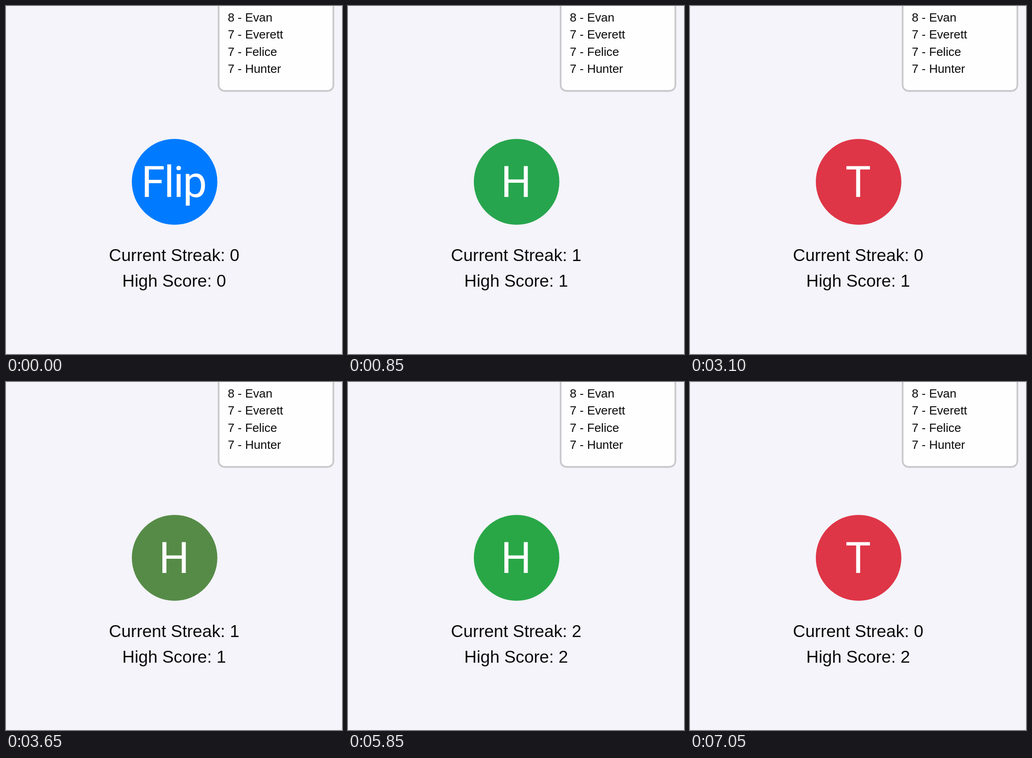
An HTML page for the animation above (7.1 s loop, 737 by 760 pixels).

```html
<!DOCTYPE html>
<html lang="en">
<head>
<meta charset="utf-8">
<title>Coin flip</title>
<style>
  html, body { margin: 0; width: 100%; height: 100%; overflow: hidden; background: #f4f4fa; }
  svg { display: block; }
  text { font-family: "Liberation Sans", Arial, sans-serif; fill: #0a0a0c; }
  #names text { font-size: 26.32px; }
  .score { font-size: 37.6px; text-anchor: middle; }
  #label { font: 94px Roboto, sans-serif; letter-spacing: -2.2px; text-anchor: middle; fill: #fff; }
</style>
</head>
<body>
<svg width="737" height="760" viewBox="0 0 737 760">
  <rect x="466.4" y="-60" width="251.7" height="245.5" rx="13" fill="#fefefe" stroke="#c9c9cd" stroke-width="3.76"/>
  <g id="names">
    <text x="486.4" y="33.8">8 - Evan</text>
    <text x="486.4" y="71.3">7 - Everett</text>
    <text x="486.4" y="108.8">7 - Felice</text>
    <text x="486.4" y="146.3">7 - Hunter</text>
  </g>
  <g id="coin">
    <circle id="disc" cx="369.8" cy="384" r="93.8"/>
    <text id="label" x="367.7" y="416.7"></text>
  </g>
  <text id="streak" class="score" x="368.9" y="557.1"></text>
  <text id="high" class="score" x="368.9" y="613.3"></text>
</svg>
<script>
const LOOP = 7100, PULSE = 140, FADE = 300;
const BLUE = [0, 123, 255], GREEN = [41, 167, 71], RED = [222, 54, 71];
const states = [
  { at: -1000, label: "Flip", color: BLUE, streak: 0, high: 0 },
  { at: 610, label: "H", color: GREEN, streak: 1, high: 1 },
  { at: 2110, label: "T", color: RED, streak: 0, high: 1 },
  { at: 3500, label: "H", color: GREEN, streak: 1, high: 1 },
  { at: 4950, label: "H", color: GREEN, streak: 2, high: 2 },
  { at: 6400, label: "T", color: RED, streak: 0, high: 2 },
];
const el = id => document.getElementById(id);
const progress = (t, length) => Math.min(1, t / length);
const easeOut = p => 1 - (1 - p) ** 2;

function draw(t) {
  const i = states.findLastIndex(s => s.at <= t);
  const now = states[i], before = states[Math.max(0, i - 1)];
  const age = t - now.at;

  // Each tap swells the coin briefly while its colour fades to the result.
  const scale = 1 + 0.05 * Math.sin(Math.PI * progress(age, PULSE));
  const mix = easeOut(progress(age, FADE));
  const rgb = now.color.map((c, k) => Math.round(before.color[k] + (c - before.color[k]) * mix));

  el("coin").setAttribute("transform", `translate(369.8 384) scale(${scale}) translate(-369.8 -384)`);
  el("disc").setAttribute("fill", `rgb(${rgb})`);
  el("label").textContent = now.label;
  el("streak").textContent = `Current Streak: ${now.streak}`;
  el("high").textContent = `High Score: ${now.high}`;
}

const start = performance.now();
function tick() {
  draw((performance.now() - start) % LOOP);
  requestAnimationFrame(tick);
}
tick();
</script>
</body>
</html>
```
